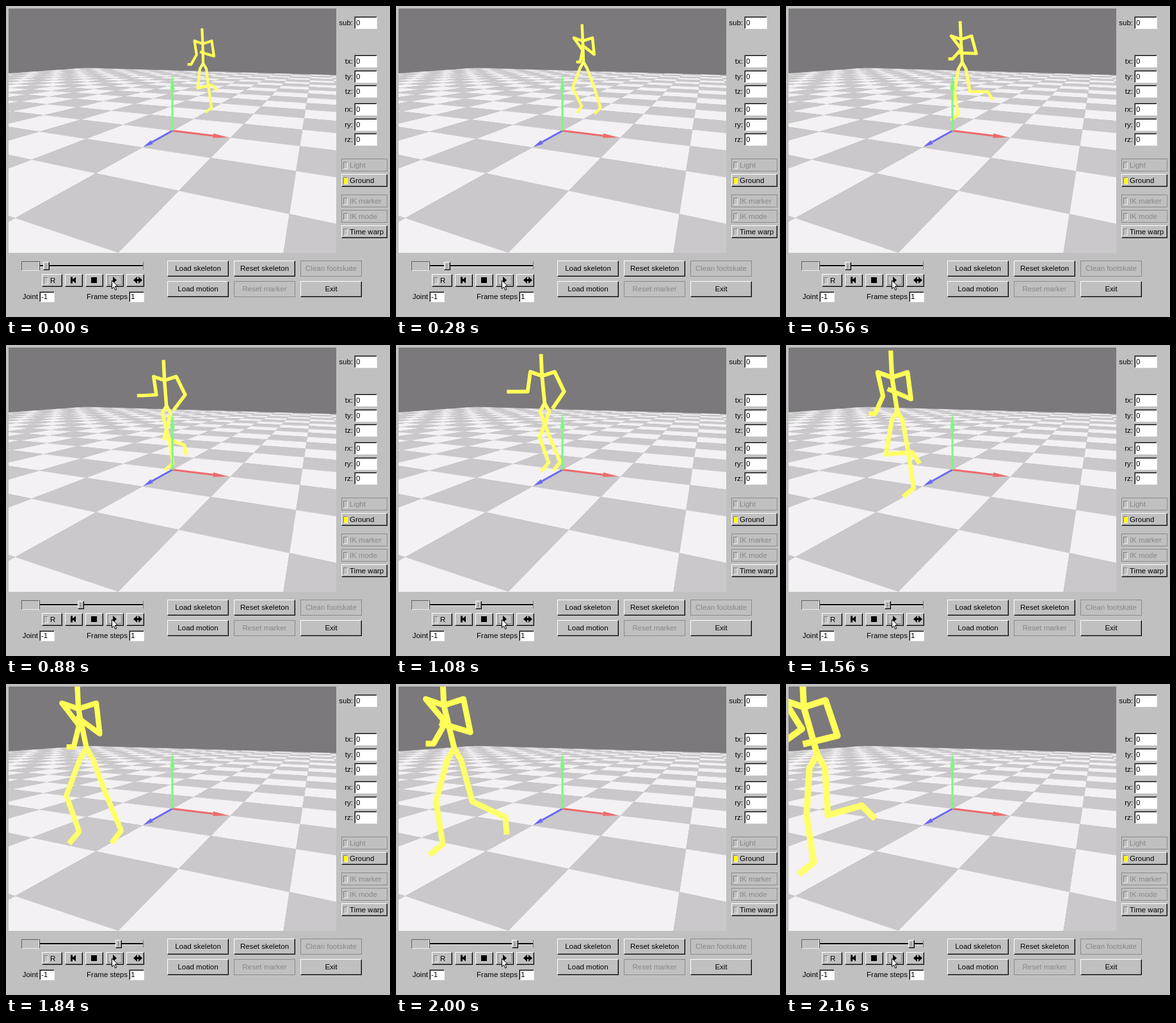
An HTML page with a canvas for the animation above (2200 ms loop, 600 by 485 pixels).

```html
<!DOCTYPE html>
<html lang="en">
<head>
<meta charset="utf-8">
<title>Motion viewer</title>
<style>
html, body { margin: 0; width: 100%; height: 100%; overflow: hidden; background: #c0c0c0; }
#stage { position: relative; width: 600px; height: 485px; overflow: hidden;
  font: 11.5px "Liberation Sans", Arial, sans-serif; color: #000; }
#stage > * { position: absolute; box-sizing: border-box; white-space: pre; }
.btn { border: 1px solid; border-color: #fff #000 #000 #fff; box-shadow: inset -1px -1px #808080; text-align: center; }
.off { border-color: #8a8a8a; box-shadow: none; color: #868686; }
.toggle { text-align: left; padding-left: 12px; }
.box { border: 1px solid; border-color: #808080 #eee #eee #808080; box-shadow: inset 1px 1px #000; background: #fff; padding-left: 2px; }
.led { border: 1px solid; border-color: #808080 #eee #eee #808080; }
.label { text-align: right; }
</style>
</head>
<body>
<div id="stage">
  <canvas id="view" width="512" height="381" style="left:4px;top:4px"></canvas>
</div>
<script>
const stage = document.getElementById('stage');
const ctx = document.getElementById('view').getContext('2d');

// ---- control panel ----
function add(cls, x, y, w, h, text = '', style = '') {
  const el = document.createElement('div');
  el.className = cls;
  el.style.cssText = `left:${x}px;top:${y}px;width:${w}px;height:${h}px;line-height:${h - 2}px;${style}`;
  el.textContent = text;
  stage.append(el);
  return el;
}
function field(name, x, y, w, h, value) {
  add('label', x - 82, y + 1, 80, h, name);
  add('box', x, y, w, h, value);
}
function toggle(y, name, off, color = '') {
  add('btn toggle' + (off ? ' off' : ''), 524, y, 72, 20, name);
  add('led', 527, y + 5, 7, 11, '', color && `background:${color}`);
}

field('sub:', 544, 16, 36, 20, '0');
['tx:', 'ty:', 'tz:'].forEach((name, i) => field(name, 544, 76 + i * 23.7, 36, 20, '0'));
['rx:', 'ry:', 'rz:'].forEach((name, i) => field(name, 544, 151 + i * 23.7, 36, 20, '0'));
toggle(238, 'Light', true);
toggle(262, 'Ground', false, '#ff0');
toggle(294, 'IK marker', true);
toggle(318, 'IK mode', true);
toggle(342, 'Time warp', false);

['Load skeleton', 'Reset skeleton', 'Clean footskate', 'Load motion', 'Reset marker', 'Exit'].forEach((name, i) =>
  add('btn' + (i == 2 || i == 4 ? ' off' : ''), 252 + i % 3 * 104, i < 3 ? 397 : 429, 96, 25, name));

add('btn toggle', 56, 418, 32, 20, 'R');
add('led', 59, 423, 7, 11);
[92, 124, 156, 188].forEach(x => add('btn', x, 418, 28, 20));
field('Joint', 52, 445, 24, 17, '-1');
field('Frame steps', 192, 445, 24, 17, '1');

add('', 24, 398, 28, 15, '', 'border:1px solid;border-color:#606060 #eee #eee #606060');
add('', 52, 398, 1, 14, '', 'background:#404040');
add('', 53, 404, 162, 3, '', 'background:#000;border-bottom:1px solid #eee');
add('', 214, 399, 1, 12, '', 'background:#808080');
const knob = add('btn', 57, 399, 10, 13, '', 'background:#c0c0c0');
knob.innerHTML = '<div style="margin:2px 3px;width:1px;height:7px;background:#777"></div>';

stage.insertAdjacentHTML('beforeend', `
<svg width="600" height="485" style="left:0;top:0">
  <rect x="159.500" y="420.500" width="21" height="14" fill="none" stroke="#555" stroke-dasharray="1 1"/>
  <path d="M101 422.500h3v4l5-4v10l-5-4v4h-3zM133 423h9v9h-9zM167 422l6 5.500-6 5.500zM199 427.500l6-5.500v4h2v-4l6 5.500-6 5.500v-4h-2v4z"/>
  <path d="M165.500 428v13l3-3 2.300 5 2-1-2.300-5h4z" fill="#fff" stroke="#000"/>
</svg>`);

// ---- scene: camera looking at the world origin ----
const rad = Math.PI / 180, focal = 190.5 / Math.tan(22.5 * rad), distance = 5;
const [cy, sy, cp, sp] = [Math.cos(25 * rad), Math.sin(25 * rad), Math.cos(15 * rad), Math.sin(15 * rad)];
const near = (x, z) => x * sy + z * cy;

function project(x, y, z) {
  const n = near(x, z), k = focal / (distance - n * cp - y * sp);
  return [260 + (x * cy - z * sy) * k, 194.5 + (n * sp - y * cp) * k];
}
function path(points) {
  ctx.beginPath();
  points.forEach(p => ctx.lineTo(...p));
}
function fill(points, color) {
  path(points);
  ctx.fillStyle = color;
  ctx.fill();
}
function stroke(points, color, width) {
  path(points);
  ctx.strokeStyle = color;
  ctx.lineWidth = width;
  ctx.stroke();
}

function drawGround() {
  ctx.fillStyle = '#7b797b';
  ctx.fillRect(4, 4, 512, 381);
  for (let x = -15; x < 15; x++)
    for (let z = -15; z < 15; z++) {
      if (near(x + 1, z + 1) > 5) continue;
      const tile = [[x, z], [x + 1, z], [x + 1, z + 1], [x, z + 1]].map(([a, b]) => project(a, 0, b));
      const color = (x + z) % 2 ? '#f3f1f3' : '#cac8ca';
      fill(tile, color);
      stroke(tile, color, 0.3);
    }
}

function drawAxis(x, y, z, color) {
  const at = k => project(x * k, y * k, z * k);
  const tip = at(1), base = at(0.74);
  const dx = tip[0] - base[0], dy = tip[1] - base[1], r = 3.5 / Math.hypot(dx, dy);
  stroke([at(0), base], color, 3);
  fill([tip, [base[0] - dy * r, base[1] + dx * r], [base[0] + dy * r, base[1] - dx * r]], color);
}

// ---- walking figure: two steps per stride, angles measured from straight down ----
const stride = 1520;
const wave = (t, peak, period = stride) => Math.cos(2 * Math.PI * (t - peak) / period);

function drawFigure(t) {
  const size = 56 / (1 - 0.000272 * t);  // grows as the walker nears the camera
  const move = ([x, y], dx, dy) => [x + dx * size, y + dy * size];
  const swing = (p, length, angle) => move(p, length * Math.sin(angle), length * Math.cos(angle));
  const bone = (color, ...points) => stroke(points, color, size * 0.074);

  const pelvis = [490 - 3.25 * size, 71 + size * (0.28 + 0.05 * wave(t, 500 - 440, stride / 2))];
  const neck = move(pelvis, 0.09 - 0.0018 * size, -0.54);

  function leg(side, lead) {
    const lift = ((1 + wave(t, lead + 1130)) / 2) ** 3;
    const shin = 0.15 + 1.75 * lift;
    const hip = move(pelvis, side, 0.16);
    const knee = swing(hip, 0.54, -0.36 * wave(t, lead - 20));
    const ankle = swing(knee, 0.55 - 0.15 * lift, shin);
    bone('#ffff6c', pelvis, hip, knee, ankle, swing(ankle, 0.22, shin - 1.05));
  }
  function arm(side, upper, upperLength, fore, foreLength, finger) {
    const shoulder = move(neck, side, -0.08);
    const elbow = swing(shoulder, upperLength, upper);
    const hand = swing(elbow, foreLength, fore);
    bone('#ffff58', neck, shoulder, elbow, hand, move(hand, finger, 0));
  }

  leg(0.09, 1080);
  leg(-0.09, 1840);
  bone('#ffff58', move(neck, -0.02, -0.43), neck, pelvis);
  const bend = wave(t, 1000);
  arm(-0.23, 0.26 + 0.45 * wave(t, 440), 0.39, -0.9 - 0.7 * bend, 0.31, -0.1);
  arm(0.25, 0.28 + 0.19 * wave(t, 960), 0.43, -1.4 + 0.85 * bend, 0.41, 0);
}

ctx.translate(-4, -4);
ctx.lineJoin = 'round';
const start = performance.now();

function draw() {
  const t = Math.floor((performance.now() - start) % 2200 / 40) * 40;
  drawGround();
  drawFigure(t);
  drawAxis(0.97, 0, 0, '#ee6a6c');
  drawAxis(0, 0, 0.97, '#6c69f0');
  drawAxis(0, 0.94, 0, '#7cf87c');
  knob.style.left = Math.round(57.5 + 0.0618 * t) + 'px';
  requestAnimationFrame(draw);
}
draw();
</script>
</body>
</html>
```
